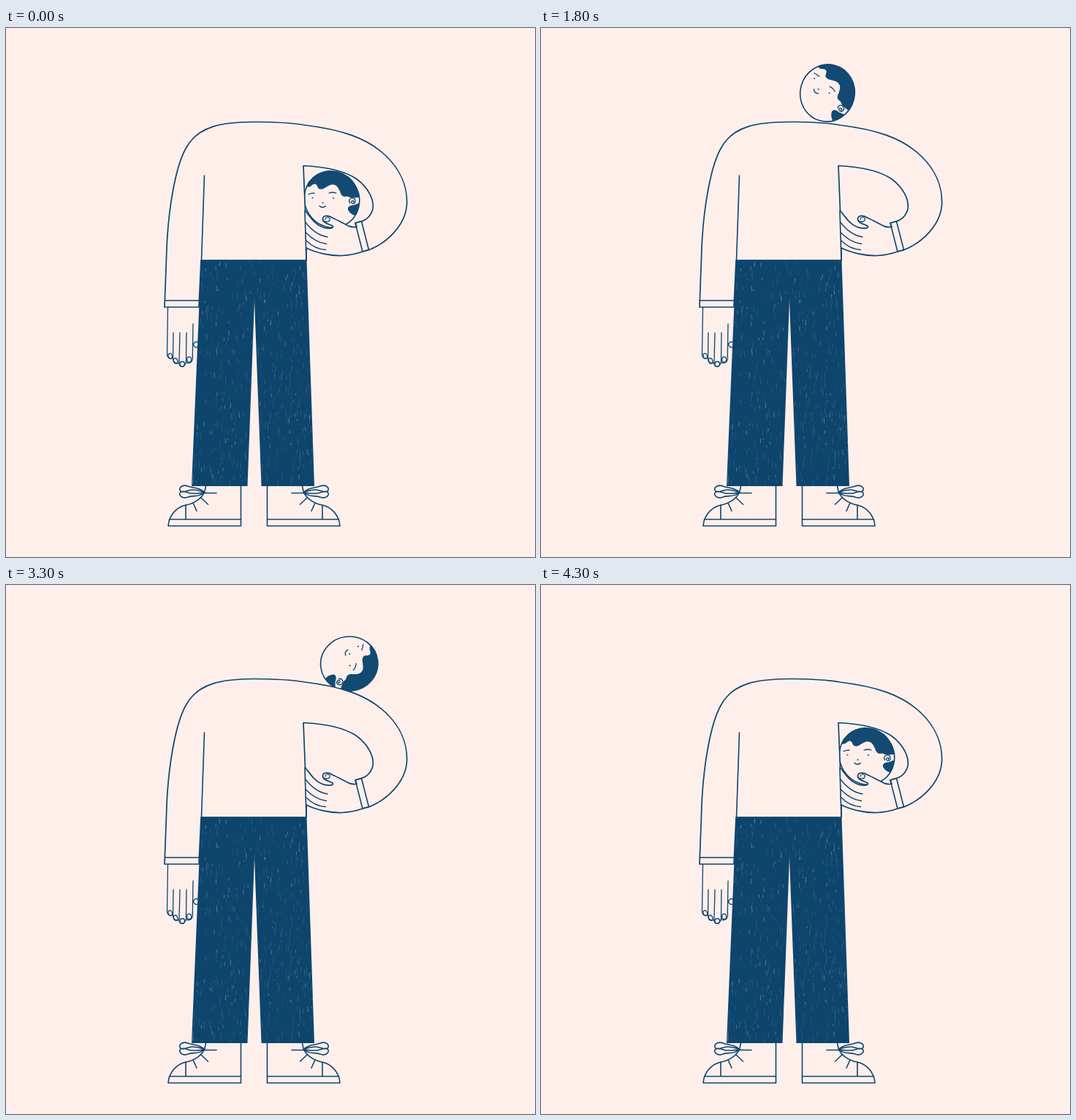
Recreate the animation shown at these times as an HTML page. Size 724 by 724 pixels, loop 4.4 s.

```html
<!DOCTYPE html>
<html lang="en">
<head>
<meta charset="utf-8">
<title>Rolling head</title>
<style>
  html, body { margin: 0; width: 100%; height: 100%; overflow: hidden; background: #ffefeb; }
  svg { display: block; width: 100vw; height: 100vh; }
  .line { fill: none; stroke: #0d456f; stroke-width: 1.6; stroke-linecap: round; stroke-linejoin: round; }
  .thin { stroke-width: 1.3; }
  .skin { fill: #ffefeb; }
  .hair { fill: #134a74; }
  .scratch { fill: none; stroke: #ffefeb; stroke-width: .6; }
</style>
</head>
<body>
<svg viewBox="0 0 724 724">
  <defs>
    <clipPath id="trouserClip"><path id="trousers" d="M267 317.5H411.5L422 627H349.5L340 373L330.5 627H254Z"/></clipPath>
    <clipPath id="headClip"><ellipse id="skull" rx="37.2" ry="39.2" transform="rotate(-30)"/></clipPath>
    <g id="shoe" class="line">
      <path d="M321.5 627V681.5H222L223 675C227 662 237 655 246 653C258 651 269 643 272 634L273.5 627"/>
      <path d="M223.5 672.5H321.5M246 653V672M271 636.5H288M267 643L276.5 652M256 650L261 661"/>
      <path d="M272 635.5C264 628 256 630 249 627C241 624 235 630 239 634C243 637 249 632 255 632C262 632 267 634 272 635.5C264 643 256 639 249 642C241 645 235 639 239 635C243 632 249 637 255 637C262 637 267 637 272 635.5"/>
    </g>
  </defs>

  <g id="head">
    <use href="#skull" class="skin"/>
    <g clip-path="url(#headClip)" class="hair">
      <path d="M-42 -17L-34 -17C-28 -16 -27 -22 -23 -21C-19 -20 -20 -14 -16 -14C-11 -13 -8 -18 -1 -20C6 -21 8 -17 11 -11C13 -5 15 -3 20 -4C24 -4 25 -1 29 -2L42 -3V-45H-42Z"/>
      <path d="M42 3L30 8C23 8 20 12 23 16C26 20 28 21 34 23L42 20Z"/>
    </g>
    <use href="#skull" class="line"/>
    <ellipse class="skin" cx="28.5" cy="2.5" rx="5.2" ry="4.5"/>
    <path class="line thin" d="M24.5 5C22 1 25 -2 29 -1.5C33 -1 33 6 29.5 6C26 6 25 3 28 2C30 1.5 31 4 29 4"/>
    <path class="line thin" d="M-32 -7Q-28 -8.5 -24 -8.5M-4 -8.5Q1 -10.5 6 -8.5M-17 9Q-13 13 -8.5 9"/>
    <g fill="#0d456f">
      <circle cx="-26.5" cy="-2" r="1"/><circle cx="2" cy="-1.8" r="1"/><circle cx="-12.5" cy="4.8" r="1"/>
    </g>
  </g>

  <path class="line thin" d="M221.5 382L220.5 445C220 452 226 455 228.5 450C228 458 235 462 237 457C236 465 244 466 246.5 457C248 460 255 459 255.5 452V449M229 417L228.5 450M238 417L237 457M247 417L246.5 457M256 405L255.3 450M263 430C258 428 255 433 258 436C260 438 262 437 263 436"/>
  <g class="line thin">
    <ellipse cx="224.8" cy="449" rx="2.6" ry="3.7" transform="rotate(-20 224.8 449)"/>
    <ellipse cx="232" cy="455.5" rx="2.8" ry="3.5" transform="rotate(-20 232 455.5)"/>
    <ellipse cx="241.3" cy="460" rx="3.2" ry="3.5"/>
    <ellipse cx="250.7" cy="453.8" rx="3" ry="3.7"/>
  </g>

  <path class="line skin" style="fill:#ffefeb;stroke-width:1.7" fill-rule="evenodd" d="
    M217 382L219.5 315C221 250 232 190 246 165C262 134 297 128.5 340 128.5C370 128.5 392 130 410 133
    C458 139 494 150 520 175C540 194 550 218 548.5 243C546 270 522 294 496 304L488 306
    C480 309 472 311 460 311.5C445 312 425 308 411 301V318H267L264 382Z
    M407 188.5C440 190 465 197 479 206C497 219 504 236 502 248C499 258 492 263 486.5 264.5L478 267L480 272
    C470 275 460 265 447 260C442 256 434 256 433.5 261C433 267 444 269 447 271C450 275 438 275 432 272C422 268 417 259 409.5 250Z"/>
  <path class="line" d="M271.5 202L267.5 318M409 250L411 318M217.5 373H264.5M478 267L488 306L496.5 303.5L486.5 264.5Z"/>
  <path class="line thin" d="M410 266C419 278 428 284 440 286M410.5 280C419 289 427 294 438.5 295.5M411 291C419 299 427 303 437.5 303.5M436.5 264.5C441 266 444 264 443 260.5C441 257.5 437 259 437 262"/>

  <use href="#trousers" fill="#0d456d"/>
  <g clip-path="url(#trouserClip)">
    <path id="faint" class="scratch" opacity=".2"/>
    <path id="bright" class="scratch" opacity=".5"/>
  </g>
  <use href="#shoe"/>
  <use href="#shoe" transform="matrix(-1 0 0 1 679 0)"/>
</svg>
<script>
  // Step, centre x, centre y, rotation; steps between are interpolated.
  const keys = [
    [0, 446, 234.5, 0], [5, 562, 198.5, -120], [6, 567.5, 171, -148], [7, 555.5, 160, -176],
    [8, 525, 134, -201], [9, 490.5, 114, -226], [11, 449, 101.5, -268],
    [12, 424, 95.5, -286], [14, 392, 89, -316], [17, 344, 88, -360]
  ];
  const head = document.getElementById('head');

  function poseAt(step) {
    const i = Math.max(1, keys.findIndex(k => k[0] >= step));
    const a = keys[i - 1], b = keys[i];
    const p = (step - a[0]) / (b[0] - a[0]);
    return a.map((v, n) => v + (b[n] - v) * p);
  }

  let seed = 7;
  const random = () => (seed = seed * 16807 % 2147483647) / 2147483647;

  function scratches(count, maxLength) {
    let d = '';
    for (let i = 0; i < count; i++) {
      const x = 254 + random() * 168, y = 318 + random() * 306;
      d += `M${x.toFixed(1)} ${y.toFixed(1)}v${(1 + random() * maxLength).toFixed(1)}`;
    }
    return d;
  }
  document.getElementById('faint').setAttribute('d', scratches(420, 10));
  document.getElementById('bright').setAttribute('d', scratches(110, 6));

  // Ten poses a second: roll up, rest, roll back the same way.
  function draw() {
    const tick = Math.floor(performance.now() % 4400 / 100);
    const step = Math.max(0, Math.min(tick - 4, 43 - tick, 17));
    const [, x, y, angle] = poseAt(step);
    head.setAttribute('transform', `translate(${x} ${y}) rotate(${angle})`);
    requestAnimationFrame(draw);
  }
  draw();
</script>
</body>
</html>
```
